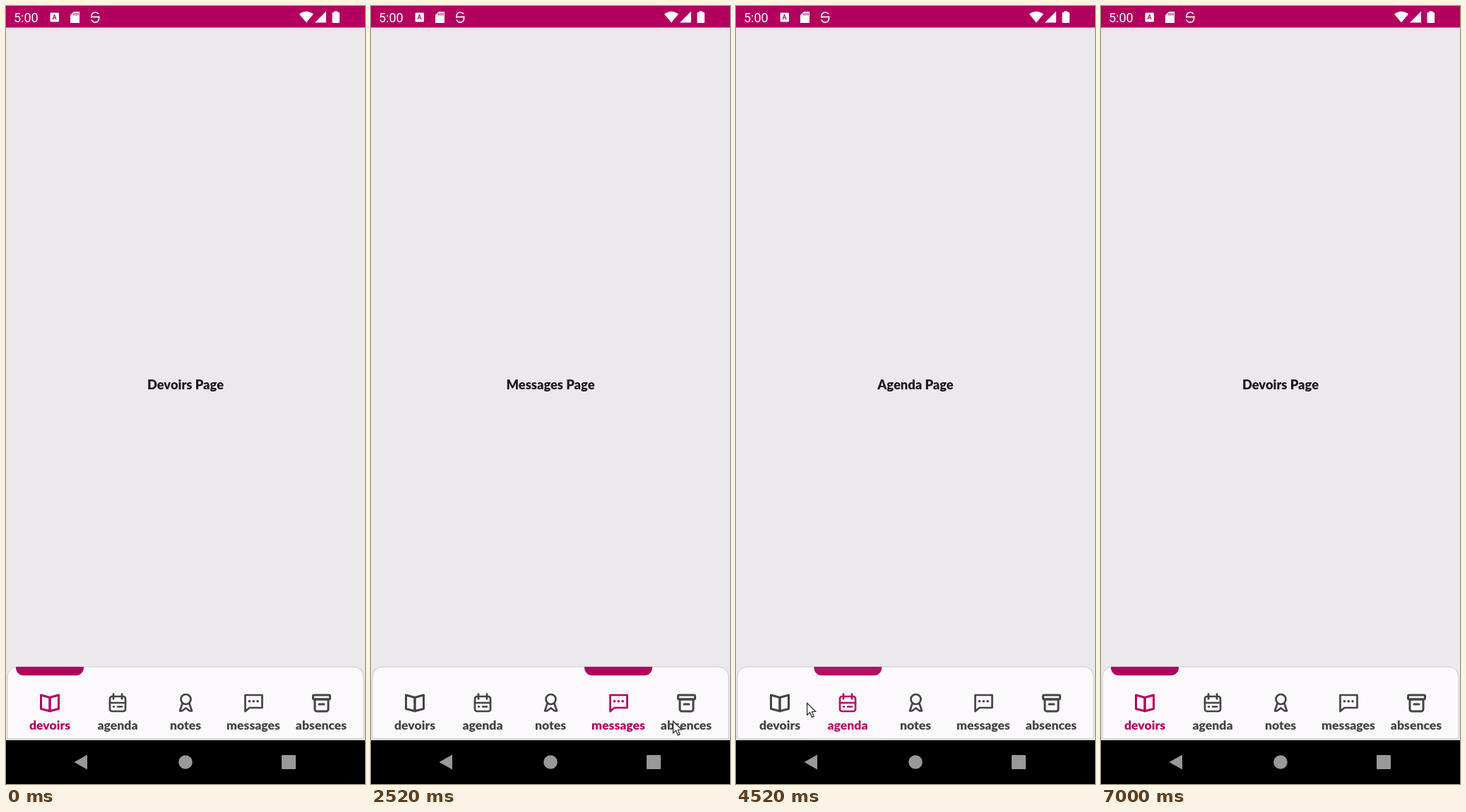
Write an HTML page with a canvas that moves like this. It is 508x1102 px and loops after 7.03 s.

```html
<!DOCTYPE html>
<html lang="fr">
<head>
<meta charset="utf-8">
<title>Navigation</title>
<style>
  html, body { margin: 0; width: 100%; height: 100%; overflow: hidden; background: #ebe9ec; }
  canvas { display: block; }
</style>
</head>
<body>
<canvas id="stage" width="508" height="1102"></canvas>
<script>
const ctx = document.getElementById('stage').getContext('2d');
const W = 508, H = 1102, LOOP = 7030;
const PINK = '#b3005e', GREY = '#454248', PAPER = '#fbf9fc', PAGE = '#ebe9ec';
const TAB_W = 96, TAB_X = 14, BAR_TOP = 936, BAR_H = 102, ICON_Y = 987;

const icons = { devoirs: book, agenda: calendar, notes: award, messages: bubble, absences: box };
const labels = Object.keys(icons);
const center = i => TAB_X + TAB_W * (i + 0.5);
const clamp = v => Math.min(1, Math.max(0, v));

// Each tap: when, which tab, where the pointer lands, how long it stays after
const taps = [
  { at: 380, tab: 1, x: 160, y: 1013, stay: 180 },
  { at: 1086, tab: 2, x: 253, y: 1013, stay: 180 },
  { at: 1570, tab: 3, x: 350, y: 1013, stay: 180 },
  { at: 2620, tab: 4, x: 427, y: 1013, stay: 530 },
  { at: 3950, tab: 1, x: 158, y: 978, stay: 510 },
  { at: 4800, tab: 0, x: 65, y: 993, stay: 1840 }
];
const entry = { at: 0, x: 146, y: 1100, stay: 30 };
const LEAD = 120;

function poly(points, close) {
  ctx.beginPath();
  points.forEach(([x, y]) => ctx.lineTo(x, y));
  if (close) ctx.closePath();
}

function fillPoly(color, ...points) {
  poly(points, true);
  ctx.fillStyle = color;
  ctx.fill();
}

function line(...points) {
  poly(points);
  ctx.stroke();
}

function round(x, y, w, h, r) {
  ctx.beginPath();
  ctx.roundRect(x, y, w, h, r);
}

function disc(x, y, r) {
  ctx.beginPath();
  ctx.arc(x, y, r, 0, Math.PI * 2);
}

function rect(color, x, y, w, h) {
  ctx.fillStyle = color;
  ctx.fillRect(x, y, w, h);
}

function text(str, x, y, font, color, align = 'center') {
  ctx.font = font;
  ctx.fillStyle = color;
  ctx.textAlign = align;
  ctx.fillText(str, x, y);
}

// Tab icons, drawn around (0, 0); s mirrors left and right
const mirror = draw => [-1, 1].forEach(draw);

function book() {
  ctx.lineWidth = 3;
  mirror(s => line([0, -7.5], [s * 12.5, -11], [s * 12.5, 8.5], [0, 11.8], [0, -7.5]));
}

function calendar() {
  round(-11, -9, 22, 21, 3);
  ctx.stroke();
  line([-11, 0], [11, 0]);
  mirror(s => line([s * 6, -12.5], [s * 6, -5.5]));
  line([-6, 5.5], [-5, 5.5]);
  line([0, 5.5], [6, 5.5]);
}

function award() {
  disc(0.5, -5, 7);
  ctx.stroke();
  mirror(s => line([0.5 + s * 5, 1], [0.5 + s * 8.5, 11.5], [0.5 + s * 5.5, 11.5], [0.5, 7.5]));
}

function bubble() {
  poly([[-11.5, 12], [-11.5, -11], [12.5, -11], [12.5, 7], [-5.5, 7]], true);
  ctx.stroke();
  for (let i = -1; i <= 1; i++) {
    disc(0.3 + i * 5.8, -2.2, 1.8);
    ctx.fill();
  }
}

function box() {
  ctx.lineWidth = 3;
  round(-11.5, -11, 24, 6, 1.5);
  ctx.stroke();
  round(-9, -5, 19, 17, [0, 0, 3, 3]);
  ctx.stroke();
  line([-3, 2], [4, 2]);
}

function tabRow(color) {
  labels.forEach((label, i) => {
    ctx.save();
    ctx.translate(center(i), ICON_Y);
    ctx.strokeStyle = ctx.fillStyle = color;
    ctx.lineWidth = 2.7;
    ctx.lineJoin = ctx.lineCap = 'round';
    icons[label]();
    ctx.restore();
    text(label, center(i), 1025, '900 17.6px Lato, sans-serif', color);
  });
}

function statusBar() {
  rect(PINK, 0, 0, W, 30.5);
  text('5:00', 11, 23, '18px Roboto, sans-serif', '#fff', 'left');

  ctx.fillStyle = '#fff';
  round(62.5, 9.5, 12.5, 13, 1.5);
  ctx.fill();
  text('A', 68.5, 19, 'bold 9px Roboto, sans-serif', PINK);

  fillPoly('#fff', [91, 13], [96, 8], [104, 8], [104, 24], [91, 24]);
  for (let i = 0; i < 3; i++) rect(PINK, 95.5 + i * 2.9, 10, 1.3, 3.5);

  ctx.strokeStyle = '#fff';
  ctx.lineWidth = 1.7;
  round(121, 9, 10.5, 14.2, 5);
  ctx.stroke();
  line([121, 15.5], [131.5, 15.5]);
  rect(PINK, 129.5, 11.5, 3.2, 2.6);
  rect(PINK, 119.8, 17, 3.2, 2.4);

  ctx.beginPath();
  ctx.moveTo(425, 23.5);
  ctx.lineTo(415, 11.5);
  ctx.quadraticCurveTo(425, 4, 435, 11.5);
  ctx.fillStyle = '#fff';
  ctx.fill();
  fillPoly('#fff', [437, 23.5], [453, 7.5], [453, 23.5]);
  round(461.5, 9, 10.5, 15, 1.2);
  ctx.fill();
  ctx.fillRect(464.3, 7.3, 5, 3);
}

function systemBar() {
  rect('#000', 0, 1040, W, 62);
  fillPoly('#999', [96.5, 1071], [115, 1060.5], [115, 1081.5]);
  disc(W / 2, 1071, 9.8);
  ctx.fill();
  round(390, 1061, 20, 20, 1);
  ctx.fill();
}

// Underdamped spring from 0 to 1, s in seconds
function spring(s) {
  if (s <= 0) return 0;
  const damp = 11, freq = 10.45;
  return 1 - Math.exp(-damp * s) * (Math.cos(freq * s) + damp / freq * Math.sin(freq * s));
}

function indicatorX(t) {
  const pos = taps.reduce((p, { at, tab }) => p + (tab - p) * spring((t - at) / 1000), 0);
  return TAB_X + pos * TAB_W;
}

function ripple(t, { at, tab }) {
  const s = (t - at) / 1000 + 0.1;
  if (s < 0 || s > 0.75) return;
  const alpha = 0.28 * clamp(s / 0.06) * clamp((0.75 - s) / 0.45);
  ctx.fillStyle = `rgba(255,255,255,${alpha})`;
  disc(center(tab), ICON_Y, 20 + 50 * clamp(s / 0.36));
  ctx.fill();
}

function navBar(t) {
  const x = indicatorX(t);
  rect('#e3e6e6', 0, 1034, W, 6);
  round(2, BAR_TOP, 504, BAR_H, [14, 14, 2, 2]);
  ctx.fillStyle = PAPER;
  ctx.fill();
  ctx.strokeStyle = '#c9c7ca';
  ctx.lineWidth = 1;
  ctx.stroke();

  ctx.save();
  ctx.clip();
  tabRow(GREY);

  // The indicator recolours whatever lies below it
  ctx.save();
  ctx.beginPath();
  ctx.rect(x, BAR_TOP, TAB_W, BAR_H);
  ctx.clip();
  rect(PAPER, x, 960, TAB_W, 74);
  tabRow(PINK);
  round(x, BAR_TOP - 4, TAB_W, 16.3, [0, 0, 11, 11]);
  ctx.fillStyle = PINK;
  ctx.fill();
  ctx.restore();

  taps.forEach(tap => ripple(t, tap));
  ctx.restore();
}

// Rests at each stop, then glides to the next with a cubic ease-out
function pointer(t) {
  const stops = [entry, ...taps];
  const last = stops[stops.length - 1];
  if (t < entry.stay || t > last.at + last.stay) return;
  const i = stops.findLastIndex(s => t >= s.at + s.stay);
  const a = stops[i], b = stops[i + 1] || a;
  const leave = a.at + a.stay;
  const p = clamp((t - leave) / (b.at - LEAD - leave));
  const e = 1 - (1 - p) ** 3;
  ctx.save();
  ctx.translate(a.x + (b.x - a.x) * e + 0.5, a.y + (b.y - a.y) * e);
  fillPoly('#fff', [0, 0], [0, 17], [4, 13.3], [6.8, 20], [9.6, 18.8], [6.9, 12.4], [12, 12]);
  ctx.strokeStyle = '#222';
  ctx.lineWidth = 1.2;
  ctx.stroke();
  ctx.restore();
}

function pageTitle(t) {
  const tap = taps.findLast(k => t >= k.at);
  const name = labels[tap ? tap.tab : 0];
  const title = name[0].toUpperCase() + name.slice(1) + ' Page';
  text(title, W / 2, 542.5, '900 18.3px Lato, sans-serif', '#1c1a1e');
}

function draw(t) {
  rect(PAGE, 0, 0, W, H);
  statusBar();
  pageTitle(t);
  navBar(t);
  systemBar();
  pointer(t);
}

const start = performance.now();
function tick() {
  draw((performance.now() - start) % LOOP);
  requestAnimationFrame(tick);
}
tick();
</script>
</body>
</html>
```
